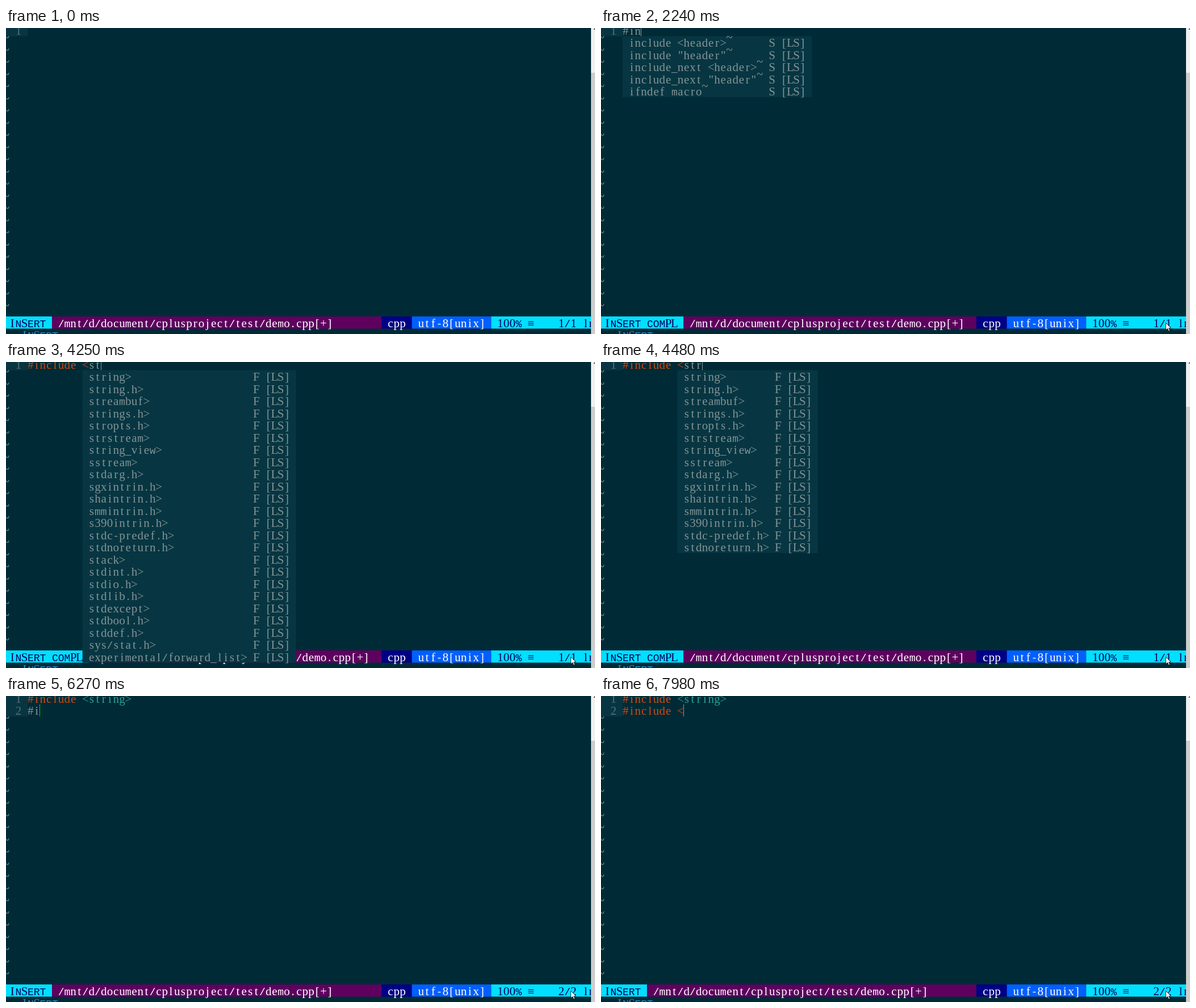
An HTML page for the animation above (8000 ms loop, 1037 by 540 pixels).

```html
<!DOCTYPE html>
<html lang="en">
<head>
<meta charset="utf-8">
<title>Editor completion</title>
<style>
  html, body { margin: 0; width: 100%; height: 100%; overflow: hidden; background: #002b36; }
  svg { display: block; width: 100vw; height: 100vh; }
  text { font: 21px "Liberation Serif", "DejaVu Sans Mono", serif; text-anchor: middle; }
  .wide { font: 18px "Liberation Mono", monospace; }
</style>
</head>
<body>
<svg viewBox="0 0 1037 540" preserveAspectRatio="none">
  <g id="screen"></g>
  <g>
    <rect x="1030" width="7" height="540" fill="#cdcdcd"/>
    <rect x="1030" width="7" height="79" fill="#f0f0f0"/>
    <path d="M1034 3L1037 0V3Z" fill="#505050"/>
  </g>
  <path id="mouse" d="M0 0V12.5L3 9.8L5 14.5L7 13.6L5.1 9.2H9Z" fill="#fff" stroke="#111" stroke-width=".8"/>
</svg>
<script>
const LOOP = 8000, CELL = 10.74, ROW = 21.5, LEFT = 38;
const C = {
  fg: '#839496', dim: '#586e75', panel: '#073642', orange: '#cb4b16', teal: '#2aa198',
  blue: '#268bd2', cyan: '#00dfff', ink: '#00005f', plum: '#5f005f', navy: '#000087',
  azure: '#005fff', white: '#fff', pale: '#eee8d5', caret: '#00d800'
};

const words = s => s.split(' ');
const headers = words('string> string.h> streambuf> strings.h> stropts.h> strstream> string_view> sstream> stdarg.h> ' +
  'sgxintrin.h> shaintrin.h> smmintrin.h> s390intrin.h> stdc-predef.h> stdnoreturn.h>');
const more = words('stack> stdint.h> stdio.h> stdlib.h> stdexcept> stdbool.h> stddef.h> sys/stat.h> experimental/forward_list>');
const list = (items, kind, col, kindCol) => ({ items, kind, col, kindCol });

const menus = {
  all: list(headers.concat(more), 'F', 9, 37),
  str: list(headers, 'F', 9, 25),
  stri: list(headers.filter(h => /^stri/.test(h)), 'F', 9, 23),
  closed: list([], '', 0, 0)
};
const snippets = ['include <header>~', 'include "header"~', 'include_next <header>~', 'include_next "header"~'];
menus.incl = list(snippets, 'S', 0, 24);
menus.inc = list(snippets.concat('ifndef macro~'), 'S', 0, 24);

// time, line, typed text, open menu, first item selected
const steps = [
  [0, 1, null],
  [860, 1, ''],
  [1550, 1, '#'],
  [2010, 1, '#i'],
  [2090, 1, '#in'],
  [2240, 1, '#in', 'inc'],
  [2550, 1, '#include', 'inc', true],
  [2950, 1, '#include '],
  [3480, 1, '#include <'],
  [3940, 1, '#include <s'],
  [4170, 1, '#include <st'],
  [4250, 1, '#include <st', 'all'],
  [4330, 1, '#include <str', 'all'],
  [4480, 1, '#include <str', 'str'],
  [4570, 1, '#include <stri', 'str'],
  [4640, 1, '#include <stri', 'stri'],
  [4720, 1, '#include <strin', 'stri'],
  [5180, 1, '#include <string>', 'closed'],
  [5430, 2, ''],
  [6040, 2, '#'],
  [6270, 2, '#i'],
  [6360, 2, '#in', 'inc'],
  [6510, 2, '#inc', 'inc'],
  [6580, 2, '#inc', 'incl'],
  [6660, 2, '#incl', 'incl'],
  [7140, 2, '#include', 'incl', true],
  [7600, 2, '#include '],
  [7980, 2, '#include <']
];
const mousePath = [[0, 994, 560], [70, 993.5, 529], [150, 993.5, 523.5], [300, 994.3, 522.5], [450, 994.5, 520.5]];

const screen = document.getElementById('screen');
const mouse = document.getElementById('mouse');
const colX = col => LEFT + col * CELL;
const rowY = row => 14.5 + (row - 2) * ROW;
const escapes = { '<': '&lt;', '>': '&gt;', '&': '&amp;' };
const latest = (rows, t) => rows.filter(r => r[0] <= t).pop();

function box(col, row, cols, rows, fill) {
  return `<rect x="${colX(col)}" y="${rowY(row)}" width="${cols * CELL}" height="${rows * ROW}" fill="${fill}"/>`;
}

// One glyph per cell; glyphs broader than a cell use the monospaced face.
function put(str, col, row, fill) {
  const glyphs = [...str].map((ch, i) => {
    if (ch === ' ') return '';
    const x = (colX(col + i) + CELL / 2).toFixed(2);
    const y = rowY(row) + (ch === '~' ? 8.5 : 18.5);
    const cls = /[mwMNCORTE%\/-]/.test(ch) ? ' class="wide"' : '';
    return `<tspan x="${x}" y="${y}"${cls}>${escapes[ch] || ch}</tspan>`;
  });
  return `<text fill="${fill}">${glyphs.join('')}</text>`;
}

function codeLine(text, row) {
  const at = text.indexOf('<');
  if (at < 0) return put(text, 0, row, C.fg);
  const done = text.endsWith('>');
  return put(text.slice(0, at), 0, row, C.orange) +
    put('<', at, row, done ? C.teal : C.orange) +
    put(text.slice(at + 1), at + 1, row, done ? C.teal : C.fg);
}

function statusLine(line, completing) {
  const mode = completing ? 'INSERT COMPL' : 'INSERT';
  const end = mode.length - 2;
  return box(-4, 25, end + 4, 1, C.cyan) + put(mode, -3, 25, C.ink) +
    box(end, 25, 58 - end, 1, C.plum) +
    put('/mnt/d/document/cplusproject/test/demo.cpp[+]', end + 1, 25, C.white) +
    box(58, 25, 5, 1, C.navy) + put('cpp', 59, 25, C.white) +
    box(63, 25, 13, 1, C.azure) + put('utf-8[unix]', 64, 25, C.white) +
    box(76, 25, 17, 1, C.cyan) + put(`100% ≡    ${line}/${line} ln`, 77, 25, C.ink) +
    put('-- INSERT --', -4, 26, C.blue);
}

function popup(menu, line, selected) {
  const { items, kind, col, kindCol } = menu;
  const width = kindCol + 7 - col;
  return box(col, line + 1, width, items.length, C.panel) + items.map((item, i) => {
    const row = line + 1 + i, on = selected && i === 0, fill = on ? C.pale : C.fg;
    return (on ? box(col, row, width, 1, C.dim) : '') +
      put(item, col + 1, row, fill) + put(kind + ' [LS]', kindCol, row, fill);
  }).join('');
}

function draw([, line, text, menuName, selected]) {
  const menu = menus[menuName];
  let out = box(-4, 1, 4, line, C.panel);
  for (let n = 1; n <= line; n++) out += put(String(n), -2, n, C.dim);
  for (let row = line + 1; row < 25; row++) out += put('~', -4, row, C.fg);
  if (line === 2) out += codeLine('#include <string>', 1);
  out += codeLine(text || '', line) + statusLine(line, menu);
  if (menu) out += popup(menu, line, selected);
  if (text !== null) {
    const quiet = (menu && menu.items.length) || text.endsWith('<');
    out += `<rect x="${Math.round(colX(text.length))}" y="${rowY(line)}" width="1" height="${ROW}" fill="${quiet ? C.fg : C.caret}"/>`;
  }
  screen.innerHTML = out;
}

let shown;
function frame(now) {
  const t = now % LOOP;
  const step = latest(steps, t);
  if (step !== shown) draw(shown = step);
  const [, x, y] = latest(mousePath, t);
  mouse.setAttribute('transform', `translate(${x} ${y})`);
}

const start = performance.now();
function tick() {
  frame(performance.now() - start);
  requestAnimationFrame(tick);
}
tick();
</script>
</body>
</html>
```
